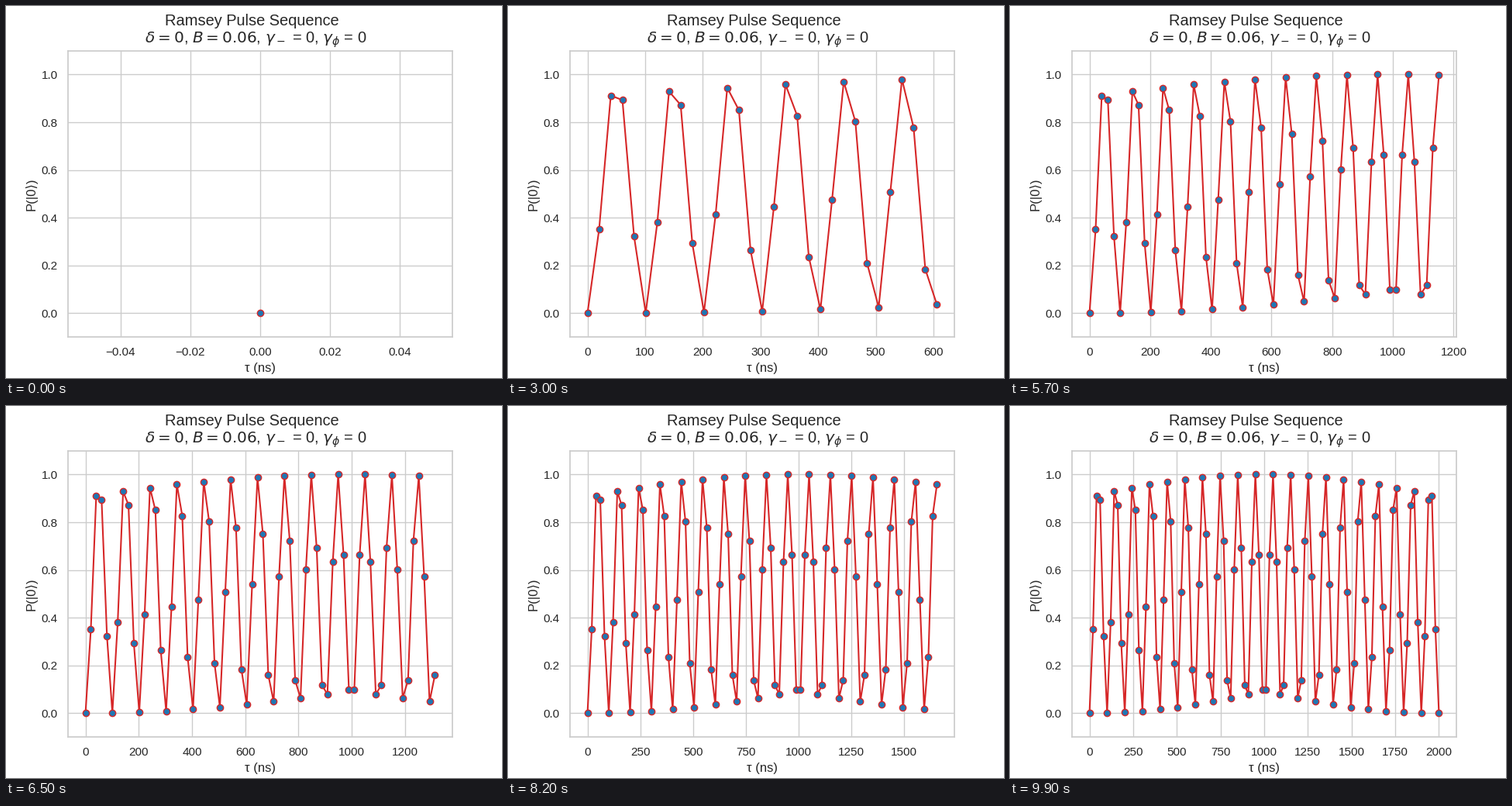
A matplotlib script for the animation above (10 s loop, 640x480 px).

```python
import numpy as np
import matplotlib.pyplot as plt
from matplotlib.animation import FuncAnimation

INK, RULE = "0.15", "0.8"

plt.rcParams.update({
    "font.family": ["Liberation Sans", "DejaVu Sans"],
    "font.size": 12,
    "axes.labelsize": 12,
    "xtick.labelsize": 11,
    "ytick.labelsize": 11,
    "text.color": INK,
    "axes.labelcolor": INK,
    "xtick.color": INK,
    "ytick.color": INK,
    "axes.edgecolor": RULE,
    "axes.linewidth": 1.25,
    "axes.grid": True,
    "axes.axisbelow": True,
    "grid.color": RULE,
    "grid.linewidth": 1,
    "xtick.bottom": False,
    "ytick.left": False,
    "xtick.major.size": 6,
    "ytick.major.size": 6,
    "lines.solid_capstyle": "round",
})

PERIOD = 100  # ns
tau = np.linspace(0, 2000, 100)
prob = np.sin(np.pi * tau / PERIOD) ** 2

fig, ax = plt.subplots(figsize=(6.4, 4.8), dpi=100)
fig.suptitle("Ramsey Pulse Sequence \n"
             r" $\delta = 0$, $B = 0.06$, $\gamma_-$ = 0, $\gamma_\phi$ = 0")
ax.set_xlabel("τ (ns)")
ax.set_ylabel("P(|0⟩)")
ax.set_ylim(-0.1, 1.1)

line, = ax.plot([], [], "o-", color="tab:red", lw=1.5, ms=6, mew=1,
                mfc="tab:blue", mec="tab:red")


def update(i):
    line.set_data(tau[:i + 1], prob[:i + 1])
    ax.relim()
    ax.autoscale_view(scaley=False)
    return line,


anim = FuncAnimation(fig, update, frames=len(tau), interval=100,
                     repeat=True, repeat_delay=0, blit=False)
plt.show()
```
